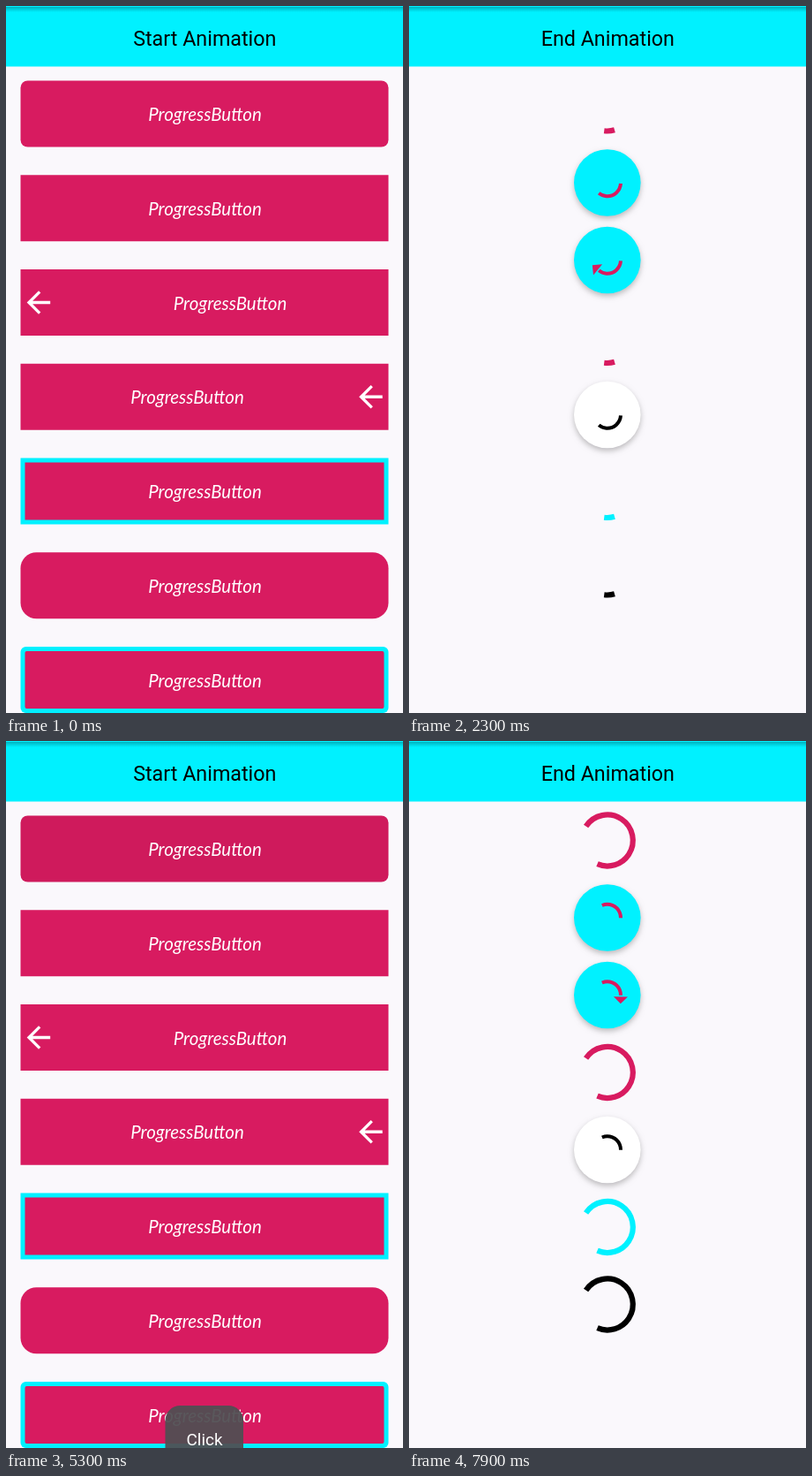
Recreate the animation shown at these times as an HTML page with a canvas. Size 450 by 800 pixels, loop 8 s.

```html
<!DOCTYPE html>
<html lang="en">
<head>
<meta charset="utf-8">
<title>Progress buttons</title>
<style>
html, body { margin: 0; width: 100%; height: 100%; overflow: hidden; background: #faf8fc; }
canvas { display: block; width: 450px; height: 800px; }
</style>
</head>
<body>
<canvas id="stage" width="450" height="800"></canvas>
<script>
const ctx = document.getElementById('stage').getContext('2d');
const PINK = '#d81b60', CYAN = '#00f1ff', PAPER = '#faf8fc', BLACK = '#000', WHITE = '#fff';
const LOOP = 8000, STEP = 100, TAU = Math.PI * 2, DEG = Math.PI / 180;
const FULL = 417, SMALL = 75, MORPH = 400;

const buttons = [
  { radius: 8 },
  { radius: 0 },
  { radius: 0, icon: 'left', shift: 28.5 },
  { radius: 0, icon: 'right', shift: -20 },
  { radius: 0, border: true },
  { radius: 18 },
  { radius: 6, border: true }
];
const spinners = [
  { color: PINK },
  { color: PINK, disc: CYAN },
  { color: PINK, disc: CYAN, arrow: true },
  { color: PINK },
  { color: BLACK, disc: WHITE },
  { color: CYAN },
  { color: BLACK }
];
// Each run: shrink start, grow start, ring clock origins, rotation offsets
const runs = [
  { start: 675, end: 3180, ring: 855, disc: 1381, ringTurn: 0, discTurn: 0 },
  { start: 5675, end: 9000, ring: 5821, disc: 6363, ringTurn: 18, discTurn: -14 }
];

const clamp = v => Math.max(0, Math.min(1, v));
const smooth = v => (1 - Math.cos(Math.PI * clamp(v))) / 2;
const mix = (a, b, k) => a + (b - a) * k;

// cubic-bezier(.4, 0, .2, 1)
function ease(x) {
  x = clamp(x);
  let lo = 0, hi = 1, s = x;
  for (let i = 0; i < 24; i++) {
    s = (lo + hi) / 2;
    const bx = 1.2 * s * (1 - s) ** 2 + 0.6 * s * s * (1 - s) + s ** 3;
    if (bx < x) lo = s; else hi = s;
  }
  return s * s * (3 - 2 * s);
}

function box(x, y, w, h, r, color) {
  ctx.fillStyle = color;
  ctx.beginPath();
  ctx.roundRect(x, y, w, h, r);
  ctx.fill();
}

function label(text, x, y, font, color) {
  ctx.font = font;
  ctx.fillStyle = color;
  ctx.textAlign = 'center';
  ctx.fillText(text, x, y);
}

function arc(r, from, to, width, color) {
  ctx.strokeStyle = color;
  ctx.lineWidth = width;
  ctx.beginPath();
  ctx.arc(0, 0, r, from * DEG, to * DEG);
  ctx.stroke();
}

function backIcon(x, y) {
  ctx.strokeStyle = WHITE;
  ctx.lineWidth = 3.3;
  ctx.beginPath();
  ctx.moveTo(x + 13.2, y);
  ctx.lineTo(x - 11, y);
  ctx.moveTo(x + 1.2, y - 12.2);
  ctx.lineTo(x - 11, y);
  ctx.lineTo(x + 1.2, y + 12.2);
  ctx.stroke();
}

function drawButton(b, i, width, pressed) {
  const x = 225 - width / 2, y = 84.5 + 106.75 * i, mid = y + 37.5;
  box(x, y, width, 75, b.radius, b.border ? CYAN : PINK);
  if (b.border) box(x + 5, y + 5, width - 10, 65, b.radius / 3, PINK);
  if (pressed) box(x, y, width, 75, b.radius, 'rgba(0,0,0,.045)');
  if (b.icon) backIcon(b.icon === 'left' ? x + 20.5 : x + width - 20, mid);
  if (width === FULL)
    label('ProgressButton', 225.5 + (b.shift || 0), mid + 8, 'italic 20.5px Lato, sans-serif', WHITE);
}

function drawRing(color, time, turn) {
  const p = time / 1333 % 1;
  const base = p * 90 + time * 720 / 6666 + turn - 90;
  arc(29, base + 270 * ease(p * 2 - 1), base + 270 * ease(p * 2), 6.2, color);
}

function drawDisc(s, time, turn) {
  const scale = smooth((time + 306) / 306);
  ctx.scale(scale, scale);
  ctx.shadowColor = 'rgba(0,0,0,.25)';
  ctx.shadowBlur = 6;
  ctx.shadowOffsetY = 3;
  ctx.fillStyle = s.disc;
  ctx.beginPath();
  ctx.arc(0, 0, 37.8, 0, TAU);
  ctx.fill();
  ctx.shadowColor = 'transparent';
  if (time < 0) return;

  const n = time / 1332, p = n % 1;
  const base = 360 * 0.21 * p + 216 * n + turn;
  const tail = base + 284.4 * ease(p * 2 - 1);
  const head = base + 284.4 * ease(p * 2) + 3.6;
  arc(15.2, tail, head, 4, s.color);
  if (s.arrow) {
    ctx.rotate(head * DEG);
    ctx.fillStyle = s.color;
    ctx.beginPath();
    ctx.moveTo(7.2, 1.5);
    ctx.lineTo(23.2, 1.5);
    ctx.lineTo(15.2, 9.5);
    ctx.fill();
  }
}

function drawHeader(running) {
  box(0, 0, 450, 68.5, 0, CYAN);
  const shade = ctx.createLinearGradient(0, 1, 0, 7);
  shade.addColorStop(0, 'rgba(0,60,70,.35)');
  shade.addColorStop(1, 'rgba(0,60,70,0)');
  box(0, 1, 450, 6, 0, shade);
  label((running ? 'End' : 'Start') + ' Animation', 225.3, 44.8, '23.3px Roboto, sans-serif', BLACK);
}

function drawToast(t) {
  ctx.globalAlpha = clamp((t - 4900) / 250) * clamp((7150 - t) / 250);
  box(180.5, 752, 88.5, 70, 17, 'rgba(80,78,82,.94)');
  label('Click', 225, 797, '19px Roboto, sans-serif', WHITE);
  ctx.globalAlpha = 1;
}

function draw(t) {
  box(0, 0, 450, 800, 0, PAPER);
  const run = runs.find(r => t >= r.start && t < r.end + MORPH);
  const running = run && t < run.end;
  drawHeader(running);

  if (running && t >= run.start + MORPH) {
    spinners.forEach((s, i) => {
      ctx.save();
      ctx.translate(224.8, 112.5 + 87.5 * i);
      if (s.disc) drawDisc(s, t - run.disc, run.discTurn);
      else drawRing(s.color, t - run.ring, run.ringTurn);
      ctx.restore();
    });
  } else {
    let width = FULL;
    if (running) width = mix(FULL, SMALL, smooth((t - run.start) / MORPH));
    else if (run) width = mix(SMALL, FULL, smooth((t - run.end) / MORPH));
    buttons.forEach((b, i) => drawButton(b, i, width, i === 0 && t >= 5100 && t < 5600));
  }
  drawToast(t);
}

const begin = performance.now();
function tick() {
  const t = (performance.now() - begin) % LOOP;
  draw(Math.floor(t / STEP) * STEP); // the picture advances ten times a second
  requestAnimationFrame(tick);
}
tick();
</script>
</body>
</html>
```
